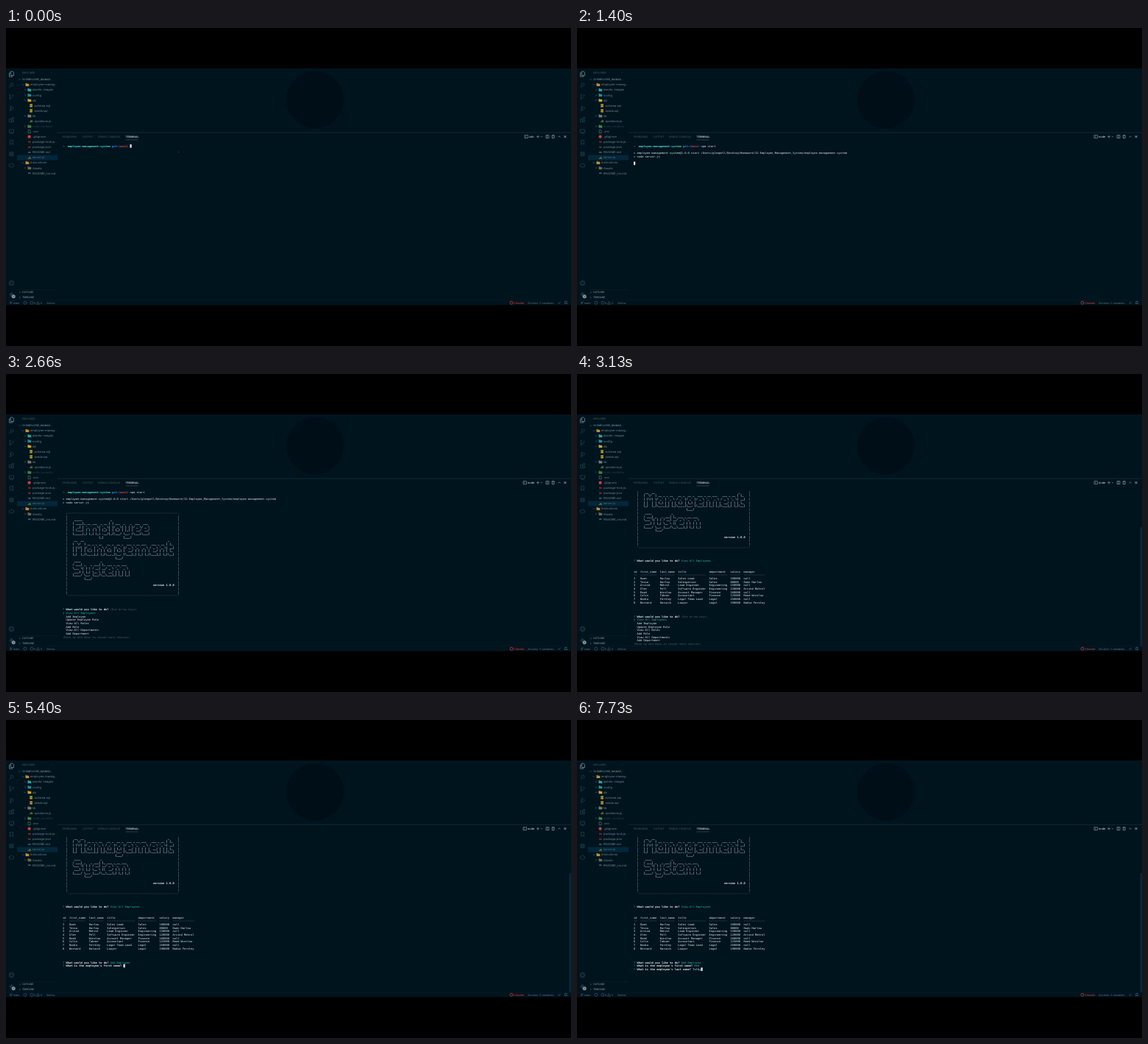
Write an HTML page with a canvas that moves like this. It is 768x432 px and loops after 8 s.

```html
<!DOCTYPE html>
<html lang="en">
<head>
<meta charset="utf-8">
<title>Terminal session</title>
<style>
html, body { margin: 0; width: 100%; height: 100%; overflow: hidden; background: #000; }
canvas { display: block; }
</style>
</head>
<body>
<canvas width="768" height="432"></canvas>
<script type="text/plain" id="logo">
 _____                 _
| ____|_ __ ___  _ __ | | ___  _   _  ___  ___
|  _| | '_ ` _ \| '_ \| |/ _ \| | | |/ _ \/ _ \
| |___| | | | | | |_) | | (_) | |_| |  __/  __/
|_____|_| |_| |_| .__/|_|\___/ \__, |\___|\___|
                |_|            |___/
 __  __                                                   _
|  \/  | __ _ _ __   __ _  __ _  ___ _ __ ___   ___ _ __ | |_
| |\/| |/ _` | '_ \ / _` |/ _` |/ _ \ '_ ` _ \ / _ \ '_ \| __|
| |  | | (_| | | | | (_| | (_| |  __/ | | | | |  __/ | | | |_
|_|  |_|\__,_|_| |_|\__,_|\__, |\___|_| |_| |_|\___|_| |_|\__|
                          |___/
 ____            _
/ ___| _   _ ___| |_ ___ _ __ ___
\___ \| | | / __| __/ _ \ '_ ` _ \
 ___) | |_| \__ \ ||  __/ | | | | |
|____/ \__, |___/\__\___|_| |_| |_|
       |___/
</script>
<script>
const LOOP = 8000;
const ctx = document.querySelector('canvas').getContext('2d');
const SANS = 'Inter, sans-serif', MONO = '"DejaVu Sans Mono", monospace';
const CELL = 2.231, ROW = 4.69, LEFT = 77, TOP = 160.4, MONO_SIZE = CELL / 0.602;
const BG = '#00141e', WHITE = '#e2eaed', DIM = '#43606c', SIDE = '#668792',
      ICON = '#234552', TEAL = '#1fb89e', RED = '#d8433f', BLUE = '#4b83ee';

// Text is set ten times larger and scaled down to keep its exact advance widths.
function text(str, x, y, size, color, weight = 400, family = SANS) {
  ctx.save();
  ctx.translate(x, y + size * 0.35);
  ctx.scale(0.1, 0.1);
  ctx.font = `${weight} ${size * 10}px ${family}`;
  ctx.textRendering = 'geometricPrecision';
  ctx.fillStyle = color;
  ctx.fillText(str, 0, 0);
  ctx.restore();
}
function box(x, y, w, h, color) {
  ctx.fillStyle = color;
  ctx.fillRect(x, y, w, h);
}
function disc(x, y, r, color) {
  ctx.fillStyle = color;
  ctx.beginPath();
  ctx.arc(x, y, r, 0, 7);
  ctx.fill();
}
function stroke(d, x, y, color, width = 0.7) {
  ctx.save();
  ctx.translate(x, y);
  ctx.strokeStyle = color;
  ctx.lineWidth = width;
  ctx.stroke(new Path2D(d));
  ctx.restore();
}

const RING = 'M-2 0A2 2 0 1 1 2 0A2 2 0 1 1 -2 0';
const FRAME = 'M-2-2H2V2H-2Z';
const DOWN = 'M-1.2-.6L0 .6L1.2-.6', RIGHT = 'M-.6-1.2L.6 0L-.6 1.2';

const activity = [
  [62.5, 'M-1.2-3.5H1.7L3-2.2V2H-1.2ZM-1.2-1.5H-3V3.6H1.2V2', '#7d99a4'],
  [78, 'M-1.4-1A2 2 0 1 1 2.6-1A2 2 0 1 1 -1.4-1M-.9 .6L-3 3'],
  [93.5, 'M-2-3V3M-2 1.5C2 1.5 2 0 2-2M1-2H3M-3 3H-1M-3-3H-1'],
  [109, 'M-1-3L3.2 0L-1 3ZM-3 0H-1M-3 3H-1'],
  [124.5, 'M-3-1H0V3H-3ZM0 1H3V3H0M.8-3H3V-.8H.8Z'],
  [140, 'M-3-2H3V2H-3ZM-1 2V3.5H2'],
  [155.5, 'M-2-3H2V3L0 1L-2 3Z'],
  [171, 'M-2.5-2.2H2.5V2.6H-2.5ZM-2.5-.7H2.5M-2.5 1H2.5'],
  [186.5, 'M-3-1L0-2.5L3-1V1.5L0 2.8L-3 1.5Z'],
  [346.5, RING + 'M-3.3 0A3.3 3.3 0 1 1 3.3 0A3.3 3.3 0 1 1 -3.3 0'],
  [362, RING + 'M-3 0H3M0-3V3'],
];

// [text x, icon colour, name, open/closed chevron, text colour]
const tree = [
  [33, '#c48a32', 'employee-manag…', DOWN],
  [36, '#2f9d99', 'assets: images', DOWN],
  [36, '#2b8992', 'config', RIGHT],
  [36, '#c7a52e', 'db', DOWN],
  [38.5, '#c7a52e', 'schema.sql'],
  [38.5, '#c7a52e', 'seeds.sql'],
  [36, '#7d7d70', 'lib', DOWN],
  [38.5, '#b7a72d', 'questions.js'],
  [36, '#4c8447', 'node_modules', RIGHT, '#203f4b'],
  [36, '#62818d', '.env'],
  [36, '#d1403a', '.gitignore'],
  [36, '#9b3034', 'package-lock.js…'],
  [36, '#9b3034', 'package.json'],
  [36, '#39728b', 'README.md'],
  [36, '#a89d2c', 'server.js', null, '#4b767c'],
  [33, '#c48a32', 'Instructions', DOWN],
  [36, '#6c684b', 'Assets', RIGHT],
  [36, '#39728b', 'README_ins.md'],
];

function drawSidebar() {
  for (const [y, d, color = ICON] of activity) stroke(d, 7.5, y, color);
  disc(10.2, 364.7, 2.5, '#8397a0');
  text('1', 9.3, 364.7, 3, BG, 700);

  text('EXPLORER', 22, 60.7, 3.4, '#48656f');
  text('···', 60, 60.7, 4, '#48656f');
  stroke(DOWN, 18.7, 70, SIDE, 0.5);
  text('12-EMPLOYEE_MANAG…', 22, 70, 3.4, SIDE, 600);
  box(15, 172.6, 55, 7, '#04263a');

  tree.forEach(([x, tint, name, chevron, color = SIDE], i) => {
    const y = 77 + i * 7.07;
    if (chevron) {
      stroke(chevron, x - 10, y, SIDE, 0.5);
      box(x - 6.5, y - 1.9, 2.2, 1, tint);
      box(x - 6.5, y - 1.2, 4.8, 3.2, tint);
    } else if (/js$/.test(name)) {
      text('JS', x - 6.5, y + 0.3, 3.6, tint, 700);
    } else if (/sql$/.test(name)) {
      box(x - 6.2, y - 2, 3.6, 4.2, tint);
      box(x - 6.2, y - 0.4, 3.6, 0.5, BG);
    } else if (name == '.gitignore') {
      disc(x - 4.4, y, 2.1, tint);
    } else if (name == '.env') {
      stroke('M-1.5-2H1L1.6-1.3V2H-1.5Z', x - 4.4, y, tint, 0.6);
    } else {
      box(x - 6, y - 0.7, 3.6, 1.4, tint);
    }
    text(name, x, y, 4, color);
  });

  box(15, 355.4, 55, 0.4, '#0a2632');
  ['OUTLINE', 'TIMELINE'].forEach((name, i) => {
    stroke(RIGHT, 18.7, 359.2 + i * 7, SIDE, 0.5);
    text(name, 22, 359.2 + i * 7, 3.5, SIDE, 600);
  });
}

function drawStatus() {
  const y = 373.3, c = '#55737e';
  box(0, 369.8, 768, 0.4, '#08222d');
  stroke('M-1-2V2M-1 .8C1 .8 1 0 1-1.8', 7, y, c, 0.6);
  text('main', 10, y, 3.7, c);
  stroke(RING, 26, y, c, 0.5);
  stroke(RING, 35, y, c, 0.5);
  text('0', 38, y, 3.7, c);
  stroke('M0-1.8L2 1.8H-2Z', 43.5, y, c, 0.5);
  text('0', 47, y, 3.7, c);
  text('Zellow', 55, y, 3.7, c);
  stroke(RING, 687, y, RED, 0.7);
  text('Checker', 690, y, 3.7, RED);
  text('Solution: 0 variables', 709, y, 3.7, c);
  stroke('M-1.5 0L-.4 1.3L1.7-1.4', 752, y, c, 0.6);
  stroke('M-1.8 1.2H1.8L1.2 0V-1.8H-1.2V0Z', 761, y, c, 0.6);
}

function drawPanelBar(shell) {
  const y = 147.6, c = '#91a6ae';
  box(70, 141.7, 698, 0.7, '#16343f');
  text('PROBLEMS', 77, y, 3.5, DIM);
  text('OUTPUT', 104, y, 3.5, DIM);
  text('DEBUG CONSOLE', 125, y, 3.5, DIM);
  text('TERMINAL', 162.5, y, 3.5, WHITE, 500);
  box(162.5, 151.7, 17, 0.5, '#48636d');

  const x = shell == 'zsh' ? 705 : 703;
  stroke('M0-2H4.5V2H0ZM1.2-.8L2.2 0L1.2 .8', x, y, c, 0.6);
  text(shell, x + 6, y, 3.9, WHITE);
  stroke('M-2 0H2M0-2V2', 723, y, c, 0.6);
  stroke(DOWN, 728, y, c, 0.5);
  stroke(FRAME + 'M0-2V2', 736, y, c, 0.6);
  stroke('M-2-1.6H2M-1.4-1.6V2H1.4V-1.6M-.6-2.2H.6', 743.7, y, c, 0.7);
  stroke('M-1.6 .7L0-.8L1.6 .7', 752, y, c, 0.6);
  stroke('M-1.5-1.5L1.5 1.5M1.5-1.5L-1.5 1.5', 760, y, WHITE, 0.6);
}

// Terminal
let scroll = 0;
function put(row, col, str, color = WHITE, weight = 400) {
  const r = row - scroll;
  if (r >= 0 && r < 45) text(str, LEFT + col * CELL, TOP + r * ROW, MONO_SIZE, color, weight, MONO);
}
function cursor(row, col) {
  box(LEFT + col * CELL, TOP + (row - scroll) * ROW - 2.3, CELL, 4.6, WHITE);
}

const logo = document.getElementById('logo').textContent.split('\n').slice(1, -1);
const choices = ['View All Employees', 'Add Employee', 'Update Employee Role', 'View All Roles',
  'Add Role', 'View All Departments', 'Add Department'];
const table = `id|first_name|last_name|title|department|salary|manager
1|Owen|Harlow|Sales Lead|Sales|100000|null
2|Tessa|Harlow|Salesperson|Sales|80000|Owen Harlow
3|Arvind|Mehrol|Lead Engineer|Engineering|150000|null
4|Glen|Pell|Software Engineer|Engineering|120000|Arvind Mehrol
5|Reed|Winslow|Account Manager|Finance|160000|null
6|Colin|Tabner|Accountant|Finance|125000|Reed Winslow
7|Nadia|Fernley|Legal Team Lead|Legal|250000|null
8|Bernard|Harwick|Lawyer|Legal|190000|Nadia Fernley`.split('\n').map(r => r.split('|'));
const widths = table[0].map((_, c) => Math.max(...table.map(r => r[c].length)));
table.splice(1, 0, widths.map(w => '-'.repeat(w)));

function ask(row, question, answer, color = TEAL) {
  put(row, 0, '?', TEAL);
  put(row, 2, question, WHITE, 700);
  put(row, question.length + 3, answer, color);
}
function menu(row, picked, answer) {
  const question = 'What would you like to do?';
  if (answer) return ask(row, question, answer);
  ask(row, question, picked ? '' : '(Use arrow keys)', DIM);
  choices.forEach((name, i) => {
    if (i == picked) put(row + 1 + i, 0, '❯', TEAL);
    put(row + 1 + i, 2, name, i == picked ? TEAL : WHITE);
  });
  put(row + 8, 0, '(Move up and down to reveal more choices)', DIM);
}
function input(row, question, typed, done) {
  ask(row, question, typed, done ? TEAL : WHITE);
  if (!done) cursor(row, question.length + 3 + typed.length);
}

function drawBanner() {
  const edge = '#b4c2c8', rule = '-'.repeat(67);
  put(6, 2, ',' + rule + '.', edge);
  for (let r = 7; r < 30; r++) {
    put(r, 2, '|', edge);
    put(r, 70, '|', edge);
  }
  logo.forEach((line, i) => put(8 + i, 6, line, WHITE, 700));
  put(27, 55, 'version 1.0.0', WHITE, 700);
  put(30, 2, '`' + rule + "'", edge);
}

function drawTerminal(t) {
  scroll = t < 3130 ? 0 : 14;
  const command = t < 260 ? '' : t < 660 ? 'npm' : 'npm start';
  put(0, 0, '➜', RED);
  put(0, 3, 'employee-management-system', '#55dcd3', 700);
  put(0, 30, 'git:(', BLUE, 700);
  put(0, 35, 'main', RED, 700);
  put(0, 39, ')', BLUE, 700);
  put(0, 41, command);
  if (t < 660) box(234, 168, 0.8, 0.8, '#6d818a');
  if (t < 1000) return cursor(0, 41 + command.length);
  if (t < 1400) return cursor(1, 0);

  put(2, 0, '> employee-management-system@1.0.0 start /Users/glenpell/Desktop/Homework/12-Employee_Management_System/employee-management-system');
  put(3, 0, '> node server.js');
  if (t < 1800) return cursor(5, 0);

  drawBanner();
  if (t < 3130) return menu(34, 0);

  menu(34, 0, choices[0]);
  table.forEach((cells, i) =>
    put(37 + i, 0, cells.map((s, c) => s.padEnd(widths[c])).join('  ')));
  box(765.6, 208, 2.4, 162, '#06293c');
  if (t < 4930) return menu(50, t < 4460 ? 0 : 1);

  menu(50, 1, choices[1]);
  const first = t < 5860 ? '' : t < 6330 ? 'N' : 'Ned';
  input(51, "What is the employee's first name?", first, t >= 6800);
  if (t < 6800) return;
  const last = t < 7260 ? '' : t < 7730 ? 'To' : 'Tolby';
  input(52, "What is the employee's last name?", last);
}

function frame(now) {
  const t = now % LOOP;
  box(0, 0, 768, 432, '#000');
  box(0, 55, 768, 321.5, BG);
  disc(420, 97.5, 39, '#000e17');
  drawSidebar();
  drawStatus();
  drawPanelBar(t < 1000 ? 'zsh' : 'node');
  drawTerminal(t);
}

const start = performance.now();
function tick() {
  frame(performance.now() - start);
  requestAnimationFrame(tick);
}
tick();
</script>
</body>
</html>
```
